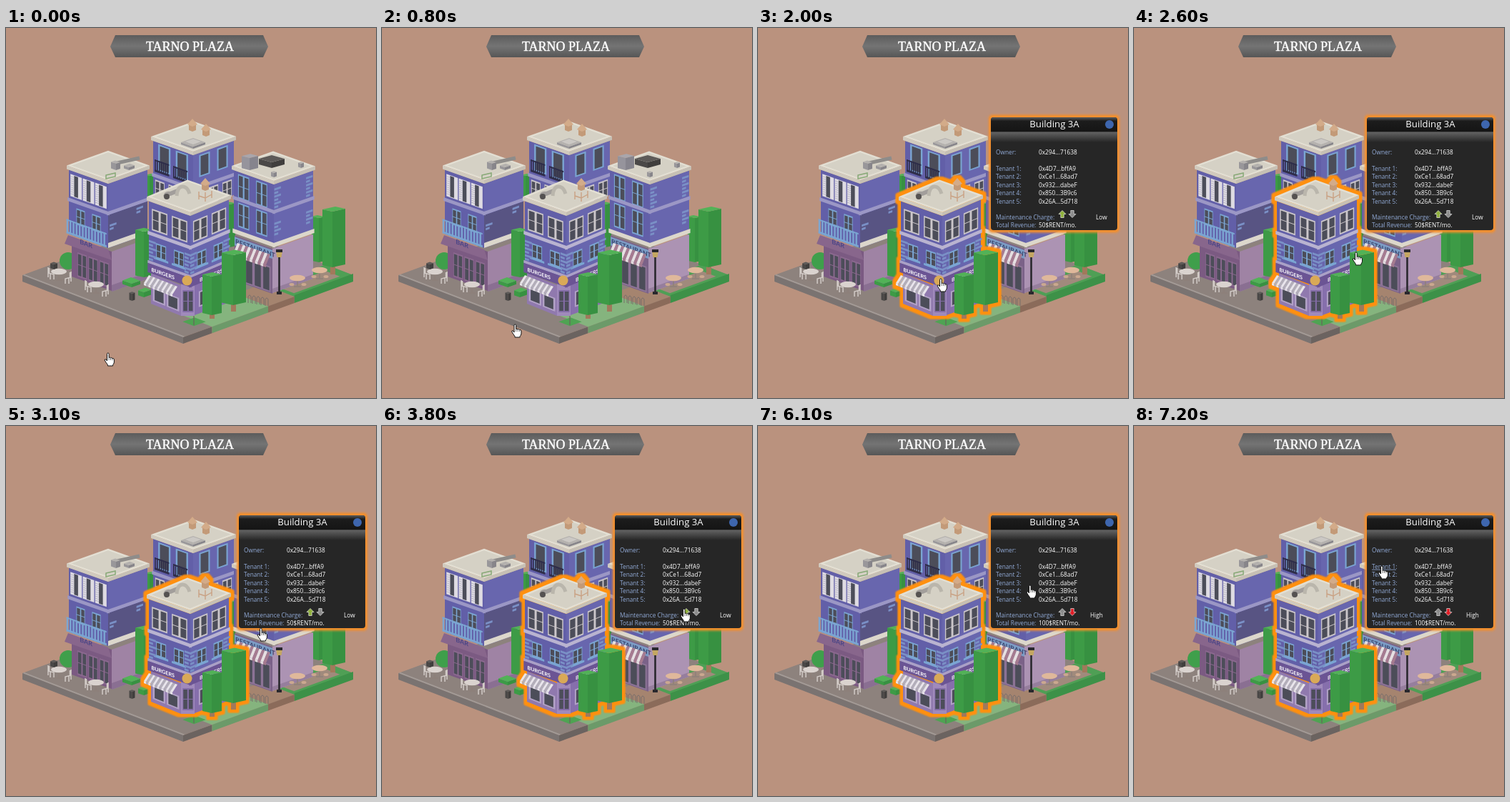
An HTML page for the animation above (8 s loop, 518 by 518 pixels).

```html
<!DOCTYPE html>
<html lang="en">
<head>
<meta charset="utf-8">
<title>Plaza map</title>
<style>
html, body { margin: 0; width: 100%; height: 100%; overflow: hidden; background: #ba927e; }
svg { display: block; width: 100vw; height: 100vh; }
.ui { font-family: "Open Sans", "Noto Sans", sans-serif; font-size: 8.3px; fill: #fff; }
.label { fill: #93acd9; }
.sign { font-family: Lato, "Open Sans", sans-serif; font-weight: 700; }
.title { font-family: "Liberation Serif", "Noto Serif", serif; font-size: 18px; fill: #fff; stroke: #fff; stroke-width: .4; }
</style>
</head>
<body>
<svg viewBox="0 0 518 518">
  <defs>
    <linearGradient id="banner" x2="0" y2="1">
      <stop stop-color="#5c5c5c"/><stop offset=".5" stop-color="#747474"/><stop offset="1" stop-color="#565656"/>
    </linearGradient>
    <linearGradient id="head" x2="0" y2="1">
      <stop stop-color="#5c5c5c"/><stop offset=".15" stop-color="#1c1c1c"/><stop offset=".56" stop-color="#151515"/>
      <stop offset=".6" stop-color="#626262"/><stop offset="1" stop-color="#262626"/>
    </linearGradient>
    <filter id="soft" x="-20%" y="-20%" width="140%" height="140%"><feGaussianBlur stdDeviation="1.6"/></filter>
    <filter id="halo" x="-10%" y="-10%" width="120%" height="120%" color-interpolation-filters="sRGB">
      <feMorphology in="SourceAlpha" operator="dilate" radius="4"/>
      <feGaussianBlur stdDeviation="1" result="edge"/>
      <feFlood flood-color="#ff900f"/>
      <feComposite in2="edge" operator="in" result="ring"/>
      <feMerge><feMergeNode in="ring"/><feMergeNode in="ring"/><feMergeNode in="SourceGraphic"/></feMerge>
    </filter>
  </defs>
  <g id="scene"></g>
  <g id="corner"></g>
  <polygon points="146,26 153,10 360,10 367,26 360,41 153,41" fill="url(#banner)"/>
  <text class="title" x="257.5" y="31.5" text-anchor="middle">TARNO PLAZA</text>
  <g id="panel" class="ui"></g>
  <g id="hand">
    <path d="M-3.5 2V-7.5Q-3.5 -9 -2.2 -9T-.9 -7.5V-2.5Q.5 -3.4 1.5 -2.2Q3 -2.9 3.9 -1.5Q5.8 -2 6.4 0V4Q6 6.5 4.6 7.5V9H-2.6V7.5Q-4.6 5 -6.8 1.2Q-7 -.6 -5.2 -.2Z" fill="#fff" stroke="#111"/>
    <path d="M-.9 -2.5V1M1.5 -2V1M3.9 -1.3V1.3" stroke="#333" stroke-width=".7" fill="none"/>
  </g>
</svg>
<script>
const $ = id => document.getElementById(id);
let out = '';
const add = s => { out += s; };
const flush = id => { $(id).innerHTML = out; out = ''; };

const poly = (pts, fill) =>
  add(`<polygon points="${pts.map(p => p.map(n => +n.toFixed(1))).join(' ')}" fill="${fill}"/>`);
const disc = (x, y, rx, ry, fill) => add(`<ellipse cx="${x}" cy="${y}" rx="${rx}" ry="${ry}" fill="${fill}"/>`);
const line = (d, color, w = 1, extra = '') => add(`<path d="${d}" fill="none" stroke="${color}" stroke-width="${w}" ${extra}/>`);
const text = (x, y, s, extra = '') => add(`<text x="${x}" y="${y}" ${extra}>${s}</text>`);
const times = (n, fn) => { for (let i = 0; i < n; i++) fn(i); };

const LEFT = '#625fa8', RIGHT = '#6866ae', BLUE = '#7ba5d2', CREAM = '#cbc6ca', GLASS = '#4c4d59';
const TRIM = '#9b97c5', STONE = '#dcd7cb';
// [top, left, right] shades of a box
const LEAF = ['#52b257', '#3d9b46', '#379141'];
const GREY = ['#b4b1ae', '#99979a', '#87858a'];
const DARK = ['#5d5a58', '#4a4847', '#403e3d'];
const K = .355;

// A face maps u (0..1 along its top edge) and v (pixels down) to the stage.
const face = (x0, y0, x1, y1) => (u, v) => [x0 + (x1 - x0) * u, y0 + (y1 - y0) * u + v];
const wedge = (x, y, a, b, m = K) => [face(x - a, y - a * K, x, y), face(x, y, x + b, y - b * m)];
const slab = (f, u0, u1, v0, v1, fill) => poly([f(u0, v0), f(u1, v0), f(u1, v1), f(u0, v1)], fill);
const band = (faces, v, h, fill) => faces.forEach(f => slab(f, -.03, 1.03, v, v + h, fill));

function sign(f, u, v, size, fill, s) {
  const [x, y] = f(u, v), [x1, y1] = f(1, v);
  add(`<text class="sign" transform="matrix(1 ${(y1 - y) / (x1 - x)} 0 1 ${x} ${y})" font-size="${size}" fill="${fill}">${s}</text>`);
}

// n windows spread over u0..u1, each filling a share of its cell and split into panes.
function windows(f, n, u0, u1, v, h, frame, { fill = .7, panes = 2, bar = true } = {}) {
  const cell = (u1 - u0) / n, w = cell * fill, pane = w / panes;
  times(n, i => {
    const u = u0 + cell * i + (cell - w) / 2;
    slab(f, u, u + w, v, v + h, frame);
    times(panes, j => slab(f, u + pane * (j + .14), u + pane * (j + .86), v + 2, v + h - 2, GLASS));
    if (bar) slab(f, u, u + w, v + h * .48, v + h * .48 + 1, frame);
  });
}

function railing(f, u0, u1, v, h, n, color) {
  const step = (u1 - u0) / n;
  slab(f, u0, u1, v, v + 2, color);
  times(n, i => slab(f, u0 + step * i, u0 + step * (i + .55), v, v + h, color));
  slab(f, u0, u1, v + h - 3, v + h, color);
}

function quoins(f, u, v0, v1) {
  times((v1 - v0) / 5, i => slab(f, u, u + (i % 2 ? .1 : .17), v0 + i * 5, v0 + i * 5 + 3, '#7a90c6'));
}

function awning(f, dx, dy, n, light, dark) {
  const g = (u, v) => { const [x, y] = f(u, v); return [x + dx, y + dy]; };
  times(n, i => {
    const a = i / n, b = (i + 1) / n, color = i % 2 ? dark : light;
    poly([f(a, 0), f(b, 0), g(b, 0), g(a, 0)], color);
    slab(g, a, b, 0, 3, color);
  });
}

// (x, y) is the front top corner; a and b reach to the left and right.
function box(x, y, a, b, h, [top, left, right], k = K) {
  const l = face(x - a, y - a * k, x, y), r = face(x, y, x + b, y - b * k);
  slab(l, 0, 1, 0, h, left);
  slab(r, 0, 1, 0, h, right);
  poly([l(0, 0), [x, y], r(1, 0), [x - a + b, y - (a + b) * k]], top);
}

function walls(x, y, a, b, h, m) {
  const faces = wedge(x, y + 5, a - 3, b - 3, m);
  faces.forEach((f, i) => slab(f, 0, 1, 0, h, i ? RIGHT : LEFT));
  return faces;
}

function roof(x, y, a, b, m = K) {
  const [l, r] = wedge(x, y, a, b, m), back = [x - a + b, y - a * K - b * m];
  const top = [l(0, 0), back, r(1, 0), [x, y]];
  const mid = [x + (b - a) / 2, y - (a * K + b * m) / 2];
  slab(l, 0, 1, 0, 5, '#d0cabe');
  slab(r, 0, 1, 0, 5, '#c6c0b5');
  poly(top, '#e3dfd3');
  poly(top.map(p => p.map((c, i) => mid[i] + (c - mid[i]) * .88)), '#d5d1c5');
}

function tank(x, y) {
  poly([[x - 5, y], [x + 5, y], [x + 5, y + 9], [x, y + 11], [x - 5, y + 9]], '#c39a78');
  poly([[x - 7, y + 1], [x, y - 7], [x + 7, y + 1], [x, y + 4]], '#d3ab89');
}

function tree(x, y, a, b, h, trunk = 0) {
  if (trunk) poly([[x - 3, y + h - 6], [x + 4, y + h - 6], [x + 4, y + h + trunk], [x - 3, y + h + trunk]], '#a1795b');
  box(x, y, a, b, h, LEAF, .22);
}

// Plaza grid: s runs to the left corner, t to the right corner.
const plaza = (s, t, v = 0) => [248 - 225 * s + 238 * t, 433 - 87 * (s + t) + v];
const tile = (s0, s1, t0, t1, fill) =>
  poly([plaza(s0, t0), plaza(s1, t0), plaza(s1, t1), plaza(s0, t1)], fill);
const rim = (t0, t1, fill, up = 0) => slab((u, v) => plaza(0, t0 + (t1 - t0) * u, v), 0, 1, -up, 9, fill);

function ground() {
  tile(0, 1, 0, 1, '#8d827d');
  tile(0, 1, 0, .012, '#a39b97');
  slab((u, v) => plaza(1 - u, 0, v), 0, 1, 0, 9, '#7a7371');
  rim(0, .17, '#6b6360');
  tile(0, .2, .17, .5, '#85b47e');
  rim(.17, .5, '#6c9a69');
  tile(0, .2, .5, .655, '#a5846f');
  rim(.5, .655, '#8b6b5a');
  tile(0, .17, .655, 1, '#4f9f55');
  tile(.03, .12, .68, .95, '#a08a7c');
  rim(.655, 1, '#3d9148', 2);
  tile(.06, .13, .12, .19, '#4fa353');
}

function backBuilding() {
  const both = walls(262, 173, 59, 60, 76), [l, r] = both;
  windows(l, 2, .06, .94, 2, 37, BLUE, { panes: 1, bar: false });
  windows(r, 2, .06, .94, 3, 31, BLUE, { panes: 1, bar: false, fill: .6 });
  [.04, .5].forEach(u => railing(l, u, u + .36, 25, 17, 7, '#2f2e4a'));
  band(both, 45, 5, TRIM);
  both.forEach(f => windows(f, 3, 0, 1, 53, 24, CREAM));
  roof(262, 173, 59, 60);
  tank(261, 134);
  tank(280, 141);
  box(262, 166, 17, 17, 3, GREY);
  box(262, 163, 11, 11, 0, ['#cbc8c4', '#999', '#999']);
}

function leftBuilding() {
  const both = walls(143, 213, 58, 58, 90), [l, r] = both;
  const [shop, side] = wedge(148, 313, 56, 49);
  slab(r, 0, 1, 44, 90, '#585483');
  slab(shop, 0, 1, 0, 55, '#7b5a82');
  slab(side, 0, 1, 0, 56, '#9f83a4');
  slab(side, 0, 1, 47, 56, '#8a6f92');
  times(3, i => {
    const u = .04 + i * .315;
    slab(l, u, u + .29, 5, 36, '#dedbe2');
    slab(l, u + .095, u + .195, 6, 35, GLASS);
    times(9, j => slab(l, u, u + .09, 8 + j * 3, 8.8 + j * 3, '#b4b1c0'));
  });
  band(both, 39, 5, TRIM);
  windows(l, 2, .1, .9, 50, 23, BLUE, { fill: .55 });
  railing(l, -.06, .96, 70, 20, 13, BLUE);
  quoins(r, .72, 48, 58);
  quoins(r, .04, 58, 68);
  slab(r, 0, 1.04, 83, 90, STONE);
  poly([[87, 290], [143, 310], [148, 325], [82, 302]], '#88668c');
  sign(shop, .2, 5, 9, '#4c4686', 'BAR');
  windows(shop, 3, .12, .95, 18, 34, '#8b698f', { fill: .85 });
  roof(143, 213, 58, 58);
  line('M151 190L187 182', '#8e8c8a', 5);
  box(154, 190, 7, 6, 9, GREY);
  box(172, 195, 7, 8, 4, GREY);
  line('M140 206l13 -3v5l-13 3z', '#87a876', 1.5);
}

function rightBuilding() {
  const both = walls(375, 214, 59, 58, 84), [l, r] = both;
  const [shop, side] = wedge(373, 309, 53, 57);
  slab(shop, 0, 1, 0, 63, '#7b6288');
  slab(side, 0, 1, 0, 62, '#ac93b3');
  slab(side, 0, 1, 56, 62, '#967e9d');
  [3, 43].forEach(v => windows(l, 2, .02, .92, v, 34, BLUE, { fill: .62 }));
  [.01, .82].forEach(u => { quoins(r, u, 6, 32); quoins(r, u, 54, 74); });
  band(both, 36, 5, TRIM);
  band(both, 82, 6, STONE);
  slab(shop, 0, 1, 2, 14, '#7c9dc6');
  sign(shop, .02, 11, 8.7, '#38426c', 'RESTAURANT');
  windows(shop, 4, .05, .95, 26, 36, '#8e7597', { fill: 1, panes: 1, bar: false });
  awning(face(324, 301, 370, 317), -6, 15, 12, '#e6dfe1', '#a67b90');
  roof(375, 214, 59, 58);
  box(341, 182, 11, 12, 17, ['#a9a6ac', '#96949c', '#86848d'], .25);
  box(372, 188, 18, 18, 8, DARK, .28);
  box(375, 203, 4, 4, 6, GREY);
  box(413, 190, 4, 4, 6, GREY);
}

function cornerBuilding() {
  const both = walls(258, 258, 61, 57, 92, .42), [l, r] = both;
  const shop = face(203, 343, 245, 360), door = face(245, 359, 264, 359), side = face(264, 358, 310, 341);
  slab(shop, 0, 1, 0, 43, '#9079ae');
  slab(door, 0, 1, -6, 44, '#a08abb');
  slab(side, 0, 1, 0, 44, '#866fac');
  band(both, 42, 5, '#b9b3d0');
  for (const f of both) {
    windows(f, 2, .02, .98, 9, 30, CREAM, { fill: .78 });
    windows(f, 2, .08, .94, 55, 21, BLUE, { fill: .56 });
    windows(f, 2, .08, .94, 75, 3, BLUE, { fill: .8, panes: 0 });
    quoins(f, 0, 54, 82);
    quoins(f, .86, 54, 82);
  }
  band(both, 83, 4, '#aaa0c6');
  band(both, 87, 13, '#6b5494');
  sign(l, .06, 97, 7.2, '#fff', 'BURGERS');
  sign(r, .24, 98, 7.2, '#f2eef4', 'BURGERS');
  windows(shop, 2, .04, .96, 19, 19, '#b2a2c6', { fill: .9, panes: 1, bar: false });
  awning(face(200, 346, 240, 362), -7, 11, 13, '#e8e5ea', '#b3afb9');
  windows(door, 1, .12, .92, 8, 31, '#836ca6', { fill: 1 });
  windows(side, 2, .06, .96, 13, 22, '#b2a2c6', { panes: 1, bar: false });
  disc(253.5, 353.5, 7, 7, '#d9a957');
  roof(258, 258, 61, 57, .42);
  line('M223 236Q224 231 230 232L240 228', '#a29e9b', 6);
  disc(225, 236, 4, 4, '#555251');
  line('M239 235Q240 222 247 222T257 232', '#bab6ac', 5);
  line('M270 240V229M279 243V230M288 238V228M270 235L279 238L288 233', '#c9a183', 1.4);
  tank(279, 217);
}

function table(x, y, top) {
  line(`M${x} ${y}v11m-5 1h10`, '#8d8079', 1.5);
  disc(x, y, 11, 4.2, top);
}

function chair(x, y, s) {
  line(`M${x} ${y}v14m0 -6l${8 * s} 2v7m${-5 * s} -8v8m${-1.5 * s} -16v8`, '#d2cbc7', 1.5);
}

function cafe() {
  times(2, i => {
    const x = 74 + i * 52, y = 341 + i * 18;
    chair(x - 15, y - 6, 1);
    table(x, y, '#dad3cf');
    chair(x + 17, y, -1);
  });
  box(67, 331, 5, 5, 7, DARK);
  box(176, 358, 13, 12, 5, LEAF);
  box(193, 370, 8, 10, 7, LEAF);
  box(176.5, 372, 4, 4, 10, DARK);
  line('M263 377V416', '#6b625d', 1.2);
}

function terrace() {
  line('M382.5 310V373', '#29282d', 2.6);
  poly([[378, 312], [387, 312], [385.5, 321], [379.5, 321]], '#c4a762');
  line('M378 312h9M379 371h7', '#29282d', 4);
  times(2, i => {
    const x = 408 + i * 31, y = 350 - i * 11;
    table(x, y, '#dfb89b');
    [-8, 9].forEach(dx => disc(x + dx, y + 9, 3.5, 2, '#cba88f'));
  });
  times(5, i => line(`M${339 + i * 6} ${385 + i}v-9q2 -4 4 0v9`, '#786e6b'));
}

function drawScene() {
  ground();
  tree(201, 207, 6, 8, 30);
  tree(313, 247, 8, 8, 60);
  backBuilding();
  tree(438, 266, 10, 8, 62);
  tree(457, 257, 14, 18, 78, 10);
  disc(87, 326, 12, 12, '#3f9f4b');
  leftBuilding();
  rightBuilding();
  tree(193, 285, 12, 12, 64);
  cafe();
  terrace();
  flush('scene');
  cornerBuilding();
  tree(318, 318, 16, 18, 70, 9);
  tree(288, 348, 13, 14, 54, 5);
  flush('corner');
}

const ARROW = 'M0 -5L5 0H2.2V5H-2.2V0H-5Z';
const OWNER = '0x294...71638';
const TENANTS = ['0x4D7...bffA9', '0xCe1...68ad7', '0x932...dabeF', '0x850...3B9c6', '0x26A...5d718'];

function drawPanel() {
  const row = (y, label, value = '', id = '') => {
    text(333, y, label, 'class="label"');
    text(393, y, value, id);
  };
  const arrow = (id, x, turn) =>
    add(`<path id="${id}" d="${ARROW}" transform="translate(${x} 260.5) rotate(${turn})" stroke="#e8e8e8" stroke-width=".7"/>`);
  add('<rect x="323" y="121.5" width="183" height="165" rx="5" fill="#f58f2c" filter="url(#soft)"/>');
  add('<rect x="326" y="125" width="177" height="158" rx="4" fill="#262626"/>');
  add('<rect x="326" y="125" width="177" height="35" rx="4" fill="url(#head)"/>');
  text(415, 139, 'Building 3A', 'text-anchor="middle" font-size="13.2"');
  disc(492, 135, 6, 6, '#3e66ae');
  row(177, 'Owner:', OWNER);
  TENANTS.forEach((id, i) => row(199.5 + i * 11.6, `Tenant ${i + 1}:`, id));
  line('M333 201.2H367', '#93acd9', .8, 'id="under"');
  row(268, 'Maintenance Charge:');
  row(279, 'Total Revenue:', '', 'id="revenue"');
  text(0, 268, '', 'id="level"');
  arrow('up', 426, 0);
  arrow('down', 440, 180);
  flush('panel');
}

// Pointer legs: start, end, then where the leg arrives.
const HOME = [145, 464];
const LEGS = [
  [0, 900, 194, 419], [900, 1650, 258, 360], [2000, 3100, 359, 292],
  [3100, 3800, 425, 265], [5100, 5900, 383, 232], [6100, 6800, 349, 205]
];
const LEVELS = [
  { from: 0, name: 'Low', x: 473 },
  { from: 4200, name: 'Average', x: 465 },
  { from: 5100, name: 'High', x: 465 }
];

function pointer(t) {
  return LEGS.reduce((pos, [t0, t1, ...goal]) => {
    const p = Math.min(1, Math.max(0, (t - t0) / (t1 - t0)));
    return pos.map((c, i) => c + (goal[i] - c) * p);
  }, HOME);
}

function update(t) {
  const hover = t >= 1900;
  const step = LEVELS.filter(l => l.from <= t).length - 1;
  const { name, x } = LEVELS[step];
  $('hand').setAttribute('transform', `translate(${pointer(t)})`);
  $('panel').setAttribute('visibility', hover ? 'visible' : 'hidden');
  $('corner').setAttribute('filter', hover ? 'url(#halo)' : 'none');
  $('under').setAttribute('opacity', t >= 6900 ? 1 : 0);
  $('level').textContent = name;
  $('level').setAttribute('x', x);
  $('revenue').textContent = `${50 + 25 * step}$RENT/mo.`;
  $('up').setAttribute('fill', step < 2 ? '#8fb03a' : '#8b8b8b');
  $('down').setAttribute('fill', step > 0 ? '#e01b24' : '#8b8b8b');
}

drawScene();
drawPanel();
const start = performance.now();
let shown = -1;
function tick() {
  // The pointer moves in steps of 100 ms.
  const t = Math.floor(((performance.now() - start) % 8000) / 100) * 100;
  if (t !== shown) update(shown = t);
  requestAnimationFrame(tick);
}
tick();
</script>
</body>
</html>
```
